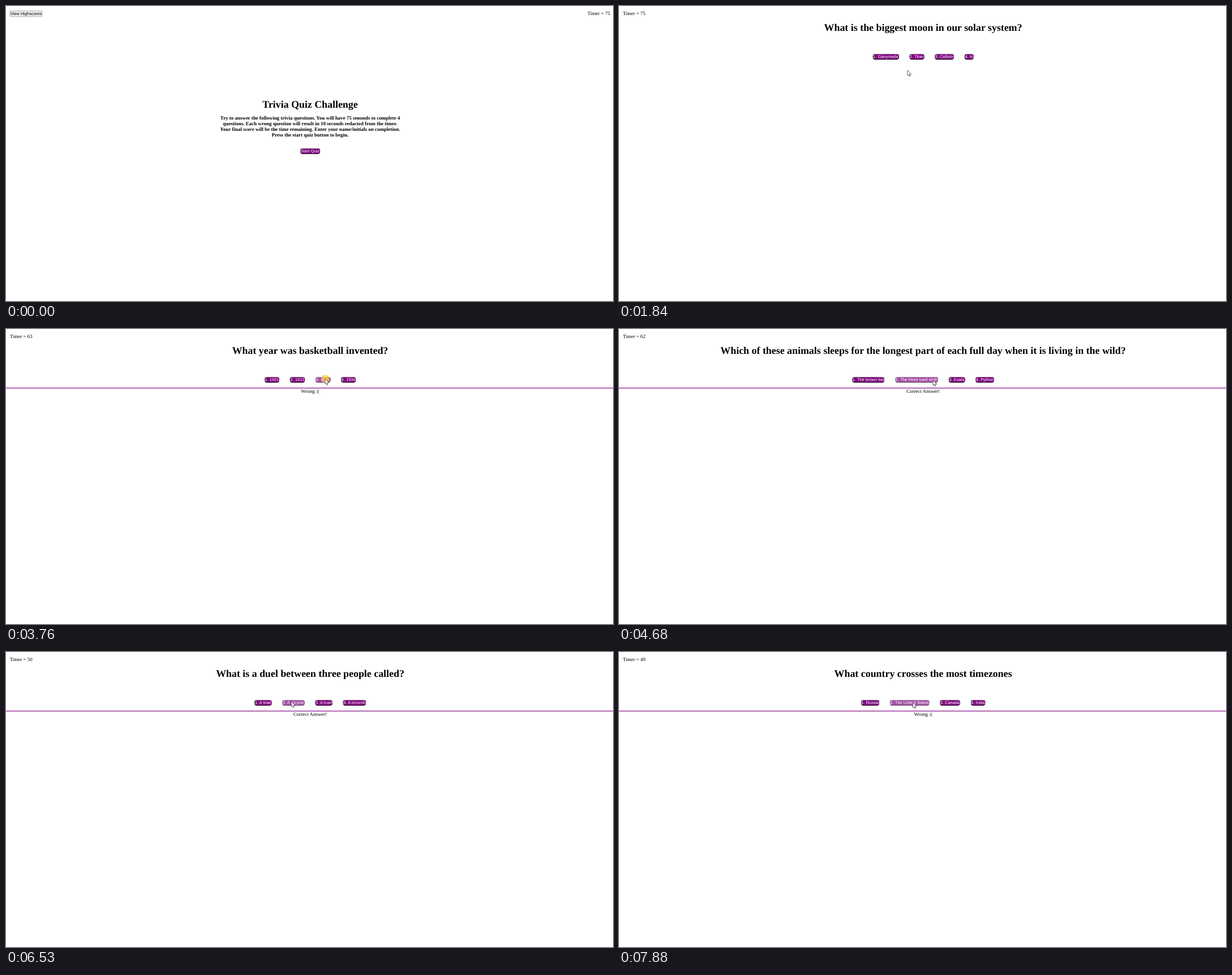
Recreate the animation shown at these times as an HTML page. Size 1073 by 522 pixels, loop 8 s.

```html
<!DOCTYPE html>
<html lang="en">
<head>
<meta charset="utf-8">
<title>Trivia quiz</title>
<style>
html, body { margin: 0; width: 100%; height: 100%; overflow: hidden; background: #fff; }
#page {
  position: absolute; left: 0; top: 0; width: 1920px; height: 934px;
  transform-origin: 0 0; transform: scale(calc(1073 / 1920));
  font: 16px/18px "Liberation Serif", "Times New Roman", serif;
  color: #000; text-rendering: geometricPrecision;
}
#page > * { position: absolute; margin: 0; white-space: nowrap; }
.mid { left: 4px; width: 1916px; text-align: center; }
h1 { font-size: 32px; line-height: 36px; top: 50px; }
#timer { left: 12px; top: 15px; }
#intro { font-weight: bold; top: 346px; }
#row { top: 151px; display: flex; justify-content: center; gap: 32.2px; }
.btn, #scores {
  box-sizing: border-box; height: 19px;
  font: 13.333px/15px "Liberation Sans", Arial, sans-serif;
}
.btn {
  border: 2px solid; border-color: #767676 #222 #222 #767676; border-radius: 8px;
  background: #800080; color: #fff;
}
.btn.hover { opacity: .7; }
#scores {
  left: 12px; top: 15px; padding: 1px; border: 1px solid #767676;
  border-radius: 3px; background: #efefef;
}
#rule { left: 0; top: 186px; width: 1920px; height: 2px; background: #800080; }
#result { top: 190px; }
.home h1 { top: 293px; }
.home #row { top: 450px; }
.home #timer { left: auto; right: 9px; }
.home #rule, #page:not(.home) > #intro, #page:not(.home) > #scores, .plain #rule { display: none; }
#pointer { position: absolute; left: 0; top: 0; overflow: visible; }
</style>
</head>
<body>
<div id="page">
  <div id="scores">View Highscores</div>
  <div id="timer"></div>
  <h1 id="title" class="mid"></h1>
  <div id="intro" class="mid">Try to answer the following trivia questions. You will have 75 senonds to complete 4<br>questions. Each wrong question will result in 10 seconds redacted from the timer.<br>Your final score will be the time remaining. Enter your name/initials on completion.<br>Press the start quiz button to begin.</div>
  <div id="row" class="mid"></div>
  <div id="rule"></div>
  <div id="result" class="mid"></div>
</div>
<svg id="pointer" width="1" height="1">
  <circle id="ring" r="7" fill="#f8d23c" fill-opacity=".72"/>
  <path d="M0 0V17L3.8 13.4L6.4 19.4L9 18.3L6.4 12.5H11.8Z" transform="scale(.57)"
    fill="#fff" stroke="#222" stroke-width="1.2"/>
</svg>
<script>
const LOOP = 8000, HOVER_LAG = 60;
const CLOCK_START = 1320, SECONDS = 75, PENALTY = 10;
const WRONG = 'Wrong :(', RIGHT = 'Correct Answer!';
const $ = id => document.getElementById(id);

// Each scene runs from `at`; the mouse goes down at `press` and stays down until the next scene.
const scenes = [
  { at: 0, press: 1160, title: 'Trivia Quiz Challenge', answers: ['Start Quiz'] },
  { at: 1290, press: 2380, title: 'What is the biggest moon in our solar system?',
    answers: ['1. Ganymede', '2. Titan', '3. Callisto', '4. Io'] },
  { at: 2650, press: 3760, title: 'What year was basketball invented?', result: WRONG,
    answers: ['1. 1921', '2. 1913', '3. 1891', '4. 1936'] },
  { at: 3890, press: 4810, result: RIGHT,
    title: 'Which of these animals sleeps for the longest part of each full day when it is living in the wild?',
    answers: ['1. The brown bat', '2. The three toed sloth', '3. Koala', '4. Python'] },
  { at: 5070, press: 6000, title: 'What is the oldest programming language still used today?', result: WRONG,
    answers: ['1. KELDRUN', '2. TASVEK', '3. Tidal Verbix', '4. TOGU'] },
  { at: 6130, press: 7570, title: 'What is a duel between three people called?', result: RIGHT,
    answers: ['1. A triad', '2. A tricycle', '3. A truel', '4. A tricomb'] },
  { at: 7700, press: LOOP, title: 'What country crosses the most timezones', result: WRONG,
    answers: ['1. Russia', '2. The United States', '3. Canada', '4. India'] }
];

// Pointer moves; `via` bends the way into a quadratic curve.
const entry = [981, 489];
const moves = [
  { from: 130, until: 890, to: [531, 254], via: [250, 100] },
  { from: 1560, until: 1840, to: [510, 113.5] },
  { from: 2120, until: 2330, to: [531.5, 89.5] },
  { from: 2920, until: 3690, to: [564, 88], via: [560, 141] },
  { from: 4350, until: 4810, to: [553, 91] },
  { from: 5340, until: 5800, to: [450, 90] },
  { from: 6250, until: 6670, to: [523, 86.5] },
  { from: 7140, until: 7500, to: [519.5, 89] }
];

const mix = (a, b, u) => a.map((v, i) => v + (b[i] - v) * u);
const ease = k => k * k * (3 - 2 * k);

function tip(t) {
  if (t < moves[0].from) return null;
  let p = entry;
  for (const { from, until, to, via } of moves) {
    if (t < from) break;
    const u = ease(Math.min(1, (t - from) / (until - from)));
    p = via ? mix(mix(p, via, u), mix(via, to, u), u) : mix(p, to, u);
  }
  return p;
}

// The clock shows a penalty only at its next tick.
function secondsLeft(t) {
  const ticks = Math.max(0, Math.floor((t - CLOCK_START) / 1000));
  const lastTick = CLOCK_START + ticks * 1000;
  const misses = scenes.filter(s => s.result === WRONG && s.at <= lastTick).length;
  return SECONDS - ticks - PENALTY * misses;
}

let shown;
function show(scene) {
  if (shown === scene) return;
  shown = scene;
  $('page').classList.toggle('home', scene === scenes[0]);
  $('page').classList.toggle('plain', !scene.result);
  $('title').textContent = scene.title;
  $('result').textContent = scene.result || '';
  $('row').replaceChildren(...scene.answers.map(text => {
    const b = document.createElement('div');
    b.className = 'btn';
    b.textContent = text;
    return b;
  }));
}

function inside(p, el) {
  const r = el.getBoundingClientRect();
  return !!p && p[0] >= r.left && p[0] <= r.right && p[1] >= r.top && p[1] <= r.bottom;
}

function draw(t) {
  const scene = scenes.filter(s => s.at <= t).pop();
  show(scene);
  $('timer').textContent = 'Timer = ' + secondsLeft(t);
  const p = tip(t), felt = tip(t - HOVER_LAG);
  for (const b of $('row').children) b.classList.toggle('hover', inside(felt, b));
  $('pointer').style.display = p ? '' : 'none';
  if (p) $('pointer').style.transform = `translate(${p[0]}px, ${p[1]}px)`;
  $('ring').setAttribute('visibility', t >= scene.press ? 'visible' : 'hidden');
}

const start = performance.now();
function tick() {
  draw((performance.now() - start) % LOOP);
  requestAnimationFrame(tick);
}
tick();
</script>
</body>
</html>
```
